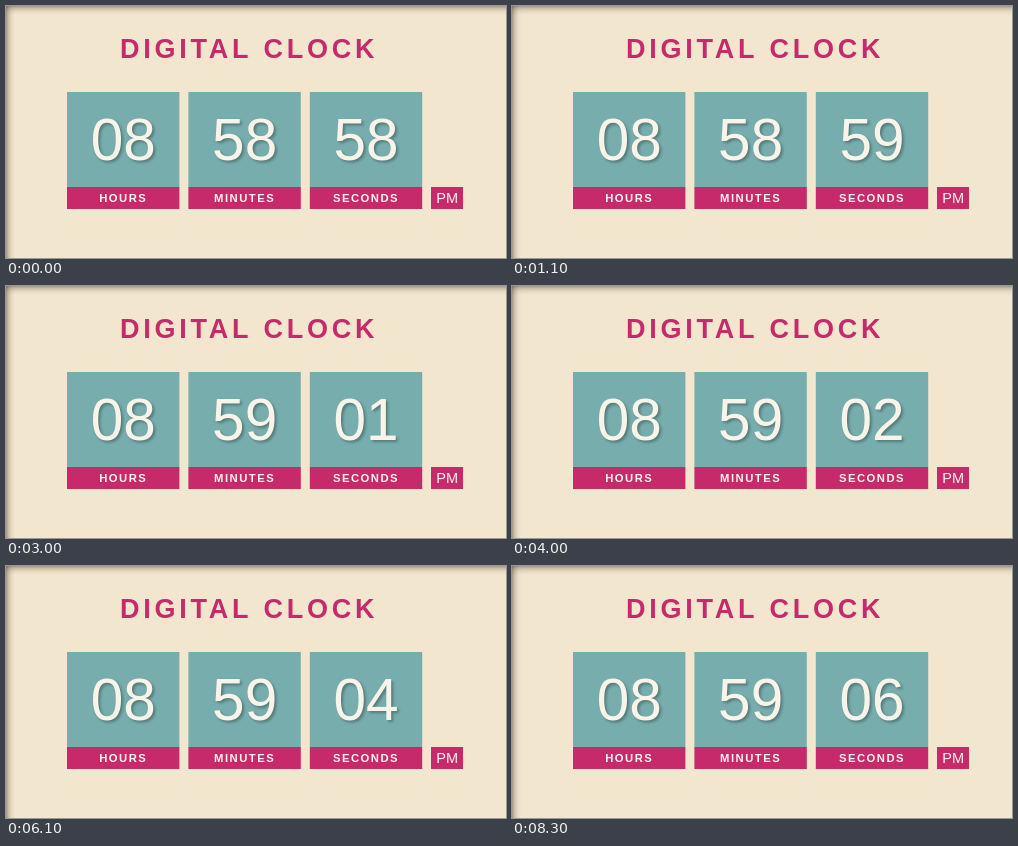
These frames come from a looping animation (500 by 252 pixels, 9 s). An HTML page with a canvas:

```html
<!DOCTYPE html>
<html lang="en">
<head>
<meta charset="utf-8">
<title>Digital Clock</title>
<style>
  html, body { margin: 0; width: 100%; height: 100%; overflow: hidden; background: #f3e6ce; }
  canvas { display: block; }
</style>
</head>
<body>
<canvas id="stage" width="500" height="252"></canvas>
<script>
const ctx = document.getElementById('stage').getContext('2d');
const FONT = '"Liberation Sans", Arial, sans-serif';
const CREAM = '#f3e6ce', TEAL = '#77aead', PINK = '#c72a6b', WHITE = '#f8f4ea';
const LOOP = 9000;
const START = 8 * 3600 + 58 * 60 + 58;
const TICKS = [1000, 2000, 3000, 4000, 5000, 6100, 7100, 8100];

const pad = n => String(n).padStart(2, '0');

function rect(x, y, w, h, color) {
  ctx.fillStyle = color;
  ctx.fillRect(x, y, w, h);
}

function text(str, x, y, font, color, spacing = 0, align = 'center') {
  ctx.font = `${font} ${FONT}`;
  ctx.letterSpacing = spacing + 'px';
  ctx.textAlign = align;
  ctx.fillStyle = color;
  ctx.fillText(str, x, y);
}

function withShadow(dx, blur, alpha, draw) {
  ctx.save();
  ctx.shadowColor = `rgba(0, 0, 0, ${alpha})`;
  ctx.shadowOffsetX = ctx.shadowOffsetY = dx;
  ctx.shadowBlur = blur;
  draw();
  ctx.restore();
}

// Soft dark rim along the top and left edges
function edge(x1, y1) {
  const g = ctx.createLinearGradient(0, 0, x1, y1);
  g.addColorStop(0, 'rgba(60, 50, 40, 0.45)');
  g.addColorStop(0.3, 'rgba(60, 50, 40, 0.2)');
  g.addColorStop(0.65, 'rgba(60, 50, 40, 0.06)');
  g.addColorStop(1, 'rgba(60, 50, 40, 0)');
  rect(0, 0, 500, 252, g);
}

function card(x, value, label) {
  const mid = x + 56.25;
  rect(x, 86, 112.4, 95, TEAL);
  rect(x, 181, 112.4, 22, PINK);
  withShadow(2, 3, 0.3, () => text(pad(value), mid, 153.5, '58.5px', WHITE));
  text(label, mid, 196, 'bold 11.25px', WHITE, 1.5);
}

function draw(ms) {
  const now = START + TICKS.filter(t => ms >= t).length;
  rect(0, 0, 500, 252, CREAM);
  edge(0, 9);
  edge(9, 0);
  text('DIGITAL CLOCK', 114, 52, 'bold 27px', PINK, 3.75, 'left');
  card(61, Math.floor(now / 3600), 'HOURS');
  card(182.4, Math.floor(now / 60) % 60, 'MINUTES');
  card(303.8, now % 60, 'SECONDS');
  rect(425, 181, 32, 22, PINK);
  text('PM', 441.2, 196.5, '14.5px', WHITE);
}

const begin = performance.now();
function frame() {
  draw((performance.now() - begin) % LOOP);
  requestAnimationFrame(frame);
}
frame();
</script>
</body>
</html>
```
